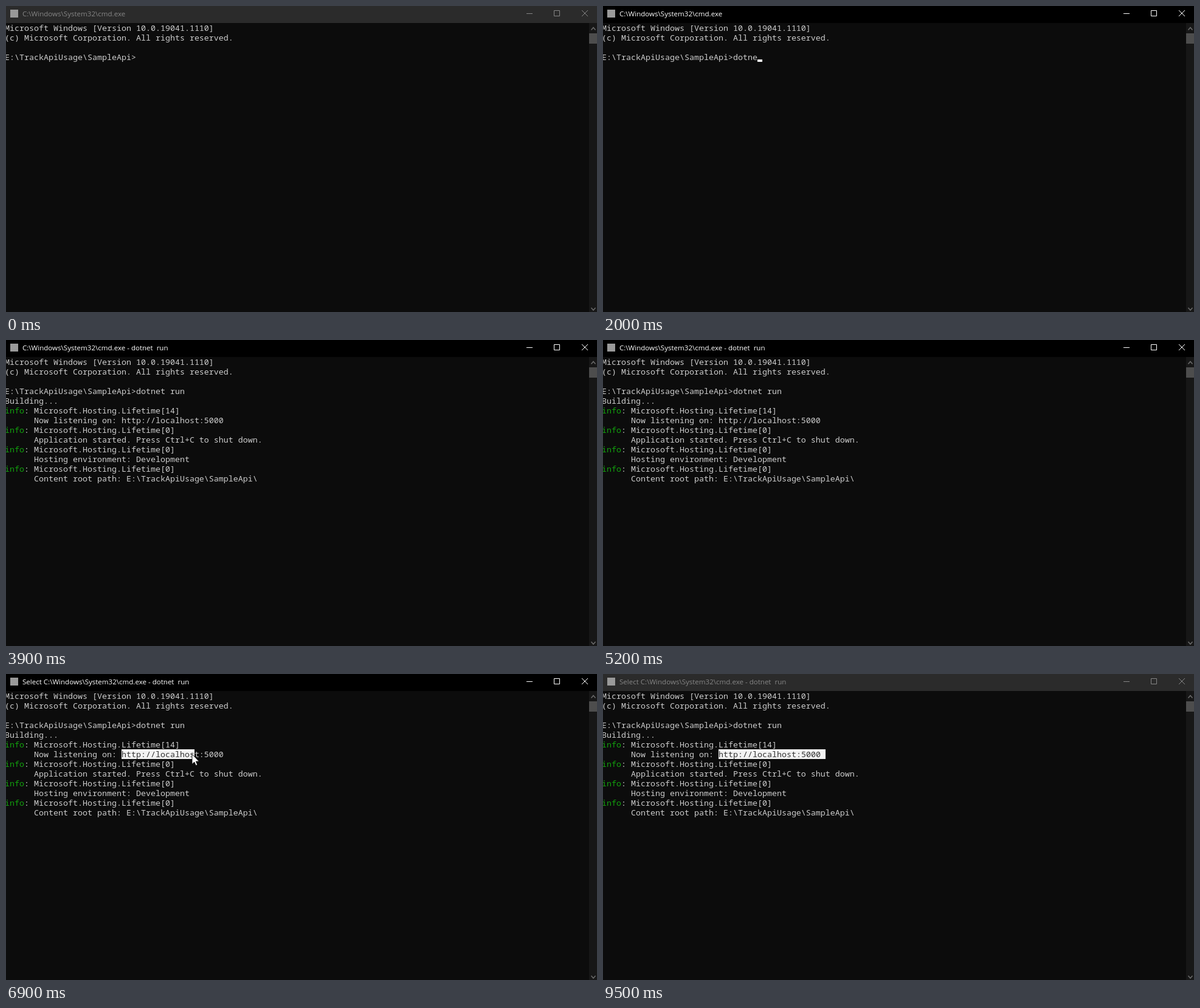
An HTML page that plays this animation: 972 by 504 pixels, repeating every 9600 ms.

```html
<!DOCTYPE html>
<html lang="en">
<head>
<meta charset="utf-8">
<title>Console</title>
<style>
  html, body { margin: 0; width: 100%; height: 100%; overflow: hidden; background: #0c0c0c; }
  svg { display: block; }
  text { white-space: pre; }
  #caption { font: 11.56px "Open Sans", sans-serif; }
  #lines, #selection { font: 13.333px "Noto Sans Mono", monospace; fill: #ccc; }
  .buttons { fill: none; stroke: currentColor; }
  .info { fill: #13a10e; }
  .arrow { fill: none; stroke: #6a6a6a; stroke-width: 1.5; }
  #bar { color: #fff; fill: #000; }
  #bar text { fill: currentColor; }
  #bar.inactive { color: #868686; fill: #2b2b2b; }
</style>
</head>
<body>
<svg width="972" height="504" viewBox="0 0 972 504">
  <rect width="972" height="504" fill="#0c0c0c"/>
  <g id="bar">
    <rect width="972" height="28"/>
    <rect x="7" y="6" width="13" height="13" fill="#999"/>
    <text id="caption" x="27" y="17"></text>
    <path class="buttons" d="M856 12.5h10M901.5 7.5h9v9h-9zM947 7l10 10M957 7l-10 10"/>
  </g>
  <g id="lines"></g>
  <svg id="selection" x="190" y="124" width="0" height="16">
    <rect width="200" height="16" fill="#f3f3f3"/>
    <text y="13" fill="#333">http://localhost:5000</text>
  </svg>
  <rect id="caret" width="8" height="4" fill="#fff"/>
  <rect x="959" y="28" width="13" height="476" fill="#171717"/>
  <rect x="959" y="45" width="13" height="17" fill="#4d4d4d"/>
  <path class="arrow" d="M962.5 39.5l3.5-4 3.5 4M962.5 497l3.5 4 3.5-4"/>
  <path id="pointer" d="M0 0V16.5L3.8 13L6.3 18.7L8.8 17.6L6.4 12H11.5Z" fill="#fff" stroke="#000" stroke-width=".8"/>
</svg>
<script>
const LOOP = 9600, STEP = 100;
const CELL = 8, ROW = 16, LEFT = -2, TOP = 28;
const PROMPT = 'E:\\TrackApiUsage\\SampleApi>';
const COMMAND = 'dotnet run';
const PROMPT_ROW = 3;
const HOST = 'Microsoft.Hosting.Lifetime';
const indent = ' '.repeat(6);

const log = [
  [0, 'Microsoft Windows [Version 10.0.19041.1110]'],
  [0, '(c) Microsoft Corporation. All rights reserved.'],
  [0, ''],
  [0, PROMPT],
  [2800, 'Building...'],
  [3900, `info: ${HOST}[14]`],
  [3900, indent + 'Now listening on: http://localhost:5000'],
  [3900, `info: ${HOST}[0]`],
  [3900, indent + 'Application started. Press Ctrl+C to shut down.'],
  [3900, `info: ${HOST}[0]`],
  [3900, indent + 'Hosting environment: Development'],
  [3900, `info: ${HOST}[0]`],
  [3900, indent + 'Content root path: E:\\TrackApiUsage\\SampleApi\\']
];

const caretOn = [[500, 1100], [1500, 2900], [3600, 3900], [4600, 5200],
                 [5700, 6200], [8300, 8800], [9400, 9500]];

// Pointer path as time, x, y
const path = [
  [5400, 362, 476], [5500, 360, 400], [5700, 340, 270], [5900, 258, 172],
  [6100, 207, 133], [6300, 193, 131], [6500, 193, 131], [7100, 362, 132],
  [7300, 368, 134], [7500, 388, 205], [7700, 450, 370], [7800, 484, 458],
  [7900, 497, 497], [8000, 503, 520]
];

const $ = id => document.getElementById(id);
const [bar, caption, lines, selection, caret, pointer] =
  ['bar', 'caption', 'lines', 'selection', 'caret', 'pointer'].map($);
const show = (el, on) => el.setAttribute('visibility', on ? 'visible' : 'hidden');
const between = (t, from, to) => t >= from && t < to;

const rows = log.map(([, content], i) => {
  const el = document.createElementNS('http://www.w3.org/2000/svg', 'text');
  el.setAttribute('x', LEFT);
  el.setAttribute('y', TOP + i * ROW + 13);
  if (content.startsWith('info')) {
    const tag = document.createElementNS(el.namespaceURI, 'tspan');
    tag.setAttribute('class', 'info');
    tag.textContent = 'info';
    el.append(tag, content.slice(4));
  } else {
    el.textContent = content;
  }
  lines.append(el);
  return el;
});
selection.querySelector('text').style.fill = '#333';

function pointerAt(t) {
  const i = path.findIndex(p => p[0] > t);
  if (i < 1) return null;
  const [a, b] = [path[i - 1], path[i]];
  const k = (t - a[0]) / (b[0] - a[0]);
  return [1, 2].map(n => a[n] + (b[n] - a[n]) * k);
}

function caretCell(t, typed) {
  if (t < 2700) return [PROMPT.length + typed, PROMPT_ROW];
  if (t < 2800) return [0, 4];
  return [0, t < 3900 ? 5 : 13];
}

function render(t) {
  const typed = Math.max(0, Math.min(COMMAND.length, Math.floor((t - 1500) / STEP)));
  rows[PROMPT_ROW].textContent = PROMPT + COMMAND.slice(0, typed);
  rows.forEach((el, i) => show(el, t >= log[i][0]));

  bar.setAttribute('class', between(t, 500, 9500) ? '' : 'inactive');
  caption.textContent = (t >= 6500 ? 'Select ' : '') + 'C:\\Windows\\System32\\cmd.exe' +
    (t >= 2700 ? ' - dotnet  run' : '');

  const [col, row] = caretCell(t, typed);
  caret.setAttribute('x', LEFT + col * CELL);
  caret.setAttribute('y', TOP + row * ROW + 12);
  show(caret, caretOn.some(span => between(t, ...span)));

  const tip = pointerAt(t);
  show(pointer, tip);
  if (tip) pointer.setAttribute('transform', `translate(${tip.map(Math.round)})`);

  const reach = t < 7100 && tip ? Math.floor((tip[0] - 190) / CELL) + 1 : 22;
  selection.setAttribute('width', reach * CELL);
  show(selection, t >= 6500);
}

const start = performance.now();
function tick() {
  const t = (performance.now() - start) % LOOP;
  render(Math.floor(t / STEP) * STEP);
  requestAnimationFrame(tick);
}
tick();
</script>
</body>
</html>
```
